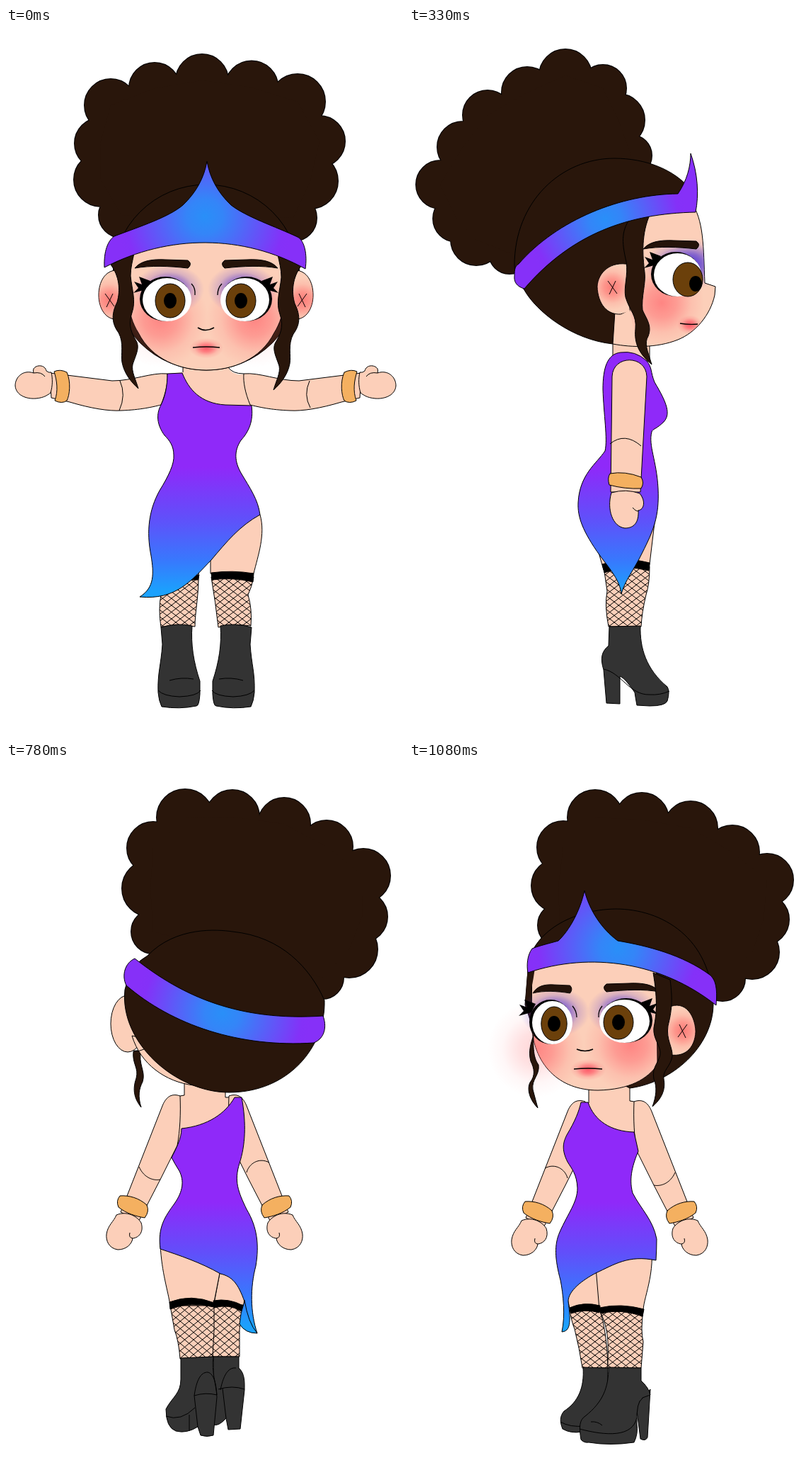
An HTML page with a canvas that plays this animation: 561 px wide and 998 px high, repeating every 1230 ms.

```html
<!DOCTYPE html>
<html lang="en">
<head>
<meta charset="utf-8">
<title>Turnaround</title>
<style>
html, body { margin: 0; width: 100%; height: 100%; overflow: hidden; background: #fff; }
canvas { display: block; width: 561px; height: 998px; }
</style>
</head>
<body>
<canvas id="stage" width="561" height="998"></canvas>
<script>
const ctx = document.getElementById('stage').getContext('2d');
const SKIN = '#fccfb9', HAIR = '#29160b', BOOT = '#333', GOLD = '#f4b060';

function shape(d, fill, line = '#000', width = 1) {
  const p = new Path2D(d);
  if (fill) { ctx.fillStyle = fill; ctx.fill(p); }
  if (line) { ctx.strokeStyle = line; ctx.lineWidth = width; ctx.stroke(p); }
}
const line = (d, width = 1) => shape(d, null, '#000', width);

function oval(x, y, rx, ry, fill, stroke) {
  ctx.beginPath();
  ctx.ellipse(x, y, rx, ry, 0, 0, 7);
  ctx.fillStyle = fill;
  ctx.fill();
  if (stroke) { ctx.strokeStyle = '#000'; ctx.lineWidth = 1; ctx.stroke(); }
}

// Draws with a shift and a horizontal scale; -1 mirrors.
function at(x, y, sx, draw) {
  ctx.save();
  ctx.translate(x, y);
  ctx.scale(sx, 1);
  draw();
  ctx.restore();
}

function within(d, draw) {
  ctx.save();
  ctx.clip(new Path2D(d));
  draw();
  ctx.restore();
}

function glow(x, y, r, rgb, alpha, squash = 1) {
  ctx.save();
  ctx.translate(x, y);
  ctx.scale(1, squash);
  const g = ctx.createRadialGradient(0, 0, 0, 0, 0, r);
  g.addColorStop(0, `rgba(${rgb},${alpha})`);
  g.addColorStop(.35, `rgba(${rgb},${alpha * .7})`);
  g.addColorStop(.7, `rgba(${rgb},${alpha * .2})`);
  g.addColorStop(1, `rgba(${rgb},0)`);
  ctx.fillStyle = g;
  ctx.fillRect(-r, -r, 2 * r, 2 * r);
  ctx.restore();
}

// Skin with rosy cheeks that spill faintly past its edge.
function face(d, ...cheeks) {
  const blush = alpha => cheeks.forEach(([x, y, r]) => glow(x, y, r, '255,105,110', alpha));
  blush(.28);
  shape(d, SKIN);
  within(d, () => blush(.72));
}

function bun(lobes) {
  ctx.beginPath();
  for (const [x, y, r] of lobes) { ctx.moveTo(x + r, y); ctx.arc(x, y, r, 0, 7); }
  ctx.strokeStyle = '#000';
  ctx.lineWidth = 2;
  ctx.stroke();
  ctx.fillStyle = HAIR;
  ctx.fill();
  ctx.beginPath();
  for (const [x, y] of lobes) ctx.lineTo(x, y);
  ctx.fill();
}

function headband(d, x, y, r = 125) {
  const g = ctx.createRadialGradient(x, y, 0, x, y, r);
  g.addColorStop(0, '#298ff8');
  g.addColorStop(.2, '#3485f8');
  g.addColorStop(.9, '#8431f8');
  g.addColorStop(1, '#8630f8');
  shape(d, g);
}

function dress(d) {
  const g = ctx.createLinearGradient(0, 620, 0, 795);
  g.addColorStop(0, '#8f29f9');
  g.addColorStop(.4, '#624efa');
  g.addColorStop(.75, '#3878fd');
  g.addColorStop(1, '#1ba1fd');
  shape(d, g);
}

function stocking(d, slope = 1.3) {
  shape(d, SKIN);
  within(d, () => {
    ctx.beginPath();
    for (let x = 40; x < 540; x += 12.5) {
      for (const s of [-1, 1]) {
        ctx.moveTo(x, 762);
        ctx.lineTo(x + s * slope * 100, 862);
      }
    }
    ctx.strokeStyle = '#000';
    ctx.lineWidth = 1;
    ctx.stroke();
  });
}
const band = d => shape(d, '#000');

function ear(d, x, y) {
  shape(d, SKIN);
  within(d, () => glow(x - 1, y, 32, '255,80,85', .65));
  line(`M${x - 7},${y - 9} L${x + 6},${y + 9} M${x + 4},${y - 9} L${x - 5},${y + 10}`);
}

// The outer corner is on the left.
function eye(x, y, rx, ix, side = 1, iy = 2, px = ix, py = iy) {
  at(x, y, side, () => {
    glow(5, -14, 49, '74,48,215', .95, .72);
    oval(-1, -.5, rx + 2, 31.5, '#000');
    shape('M-28,-14 L-46,-9 L-39,-16 L-45,-25 L-34,-21 L-38,-32 L-22,-26Z', '#000', null);
    oval(1.5, .5, rx + .5, 30.5, '#fff');
    oval(ix, iy, Math.min(21, rx * .65), 24, '#6b400b', true);
    oval(px, py, 9, 11, '#000');
  });
}
const brow = (x, y, sx) => at(x, y, sx, () =>
  shape('M-80,6 C-72,-4 -57,-7 -37,-6 L-5,-5 Q2,0 -5,6 C-32,3 -57,2 -80,6Z', '#24130a'));

function lips(x, y, w = 19) {
  glow(x, y + 1, w + 5, '255,85,100', .95, .6);
  line(`M${x - w},${y} Q${x},${y - 2} ${x + w},${y}`, 1.4);
}

// ---- arms ----
function wideArm(elbow) {
  shape('M228,488 C205,486 180,498 150,498 L62,487 L64,522 L90,528 C120,537 145,541 163,540 C190,539 207,535 219,532 C226,515 229,500 228,488Z', SKIN);
  line(`M${elbow},498 Q${elbow + 9},518 ${elbow - 1},${elbow > 150 ? 540 : 536}`);
  shape('M64,486 Q60,487 57,484 C55,475 43,475 39,481 Q38,484 39,487 C25,482 13,492 13,505 C14,518 28,524 42,523 C55,522 60,517 63,515 C66,505 66,495 64,486Z', SKIN);
  line('M39,487 Q50,485 55,492');
  shape('M68,485 Q76,481 86,486 C92,500 90,518 86,526 Q79,531 69,526 C74,512 72,498 68,485Z', GOLD);
}
function wideArms(leftElbow) {
  wideArm(leftElbow);
  at(564, 0, -1, () => wideArm(135));
}

function lowArm(elbow) {
  shape('M266,476 C252,471 245,480 241,490 L182,640 L208,652 L238,594 L262,546 C266,525 267,500 266,476Z', SKIN);
  line(elbow);
  shape('M176,644 C190,638 205,645 211,655 C215,668 208,676 199,677 C198,685 190,693 178,693 C165,691 161,680 162,671 C164,658 172,654 176,644Z', SKIN);
  line('M199,677 Q193,676 195,669');
  shape('M181,617 C194,616 208,620 219,630 Q223,639 216,648 C204,646 190,642 179,633 Q175,624 181,617Z', GOLD);
}
function lowArms() {
  shape('M272,455 V474 L266,476 L262,548 L300,590 L354,570 L360,520 L341,478 L330,478 V455', SKIN, null);
  line('M272,455 V475 L266,476 M330,455 V478 H341');
  lowArm('M208,576 C215,592 229,596 238,594');
  at(601, 0, -1, () => lowArm('M209,570 C224,562 238,572 241,584'));
}

// ---- heads ----
function frontLock() {
  shape('M148,334 C160,350 162,370 157,387 C148,405 150,418 159,430 C167,445 162,460 164,472 C167,488 177,500 187,509 C183,495 177,485 179,475 C184,460 190,450 183,440 C174,425 174,415 178,402 C184,385 178,370 176,350 C176,338 179,328 181,318Z', HAIR);
}
const frontEar = () =>
  ear('M155,342 C140,343 131,358 131,377 C131,396 141,411 155,411 L176,405 L176,350Z', 147, 384);

function frontHead() {
  oval(283, 352, 132, 131, HAIR, true);
  frontEar();
  at(565, 0, -1, frontEar);
  face('M171,296 H395 C398,370 395,405 379,430 C360,468 320,483 283,483 C246,483 206,468 187,430 C171,405 168,370 171,296Z',
    [218, 411, 68], [351, 411, 68]);
  eye(226, 383, 34, 6);
  eye(339, 383, 34, 7, -1);
  brow(262, 333, 1);
  brow(304, 333, -1);
  line('M262,361 Q268,367 267,377 M305,361 Q299,367 299,377', 1.3);
  line('M271,423 Q282,430 294,423', 1.5);
  lips(283, 451);
  frontLock();
  at(565, 2, -1, frontLock);
  headband('M139,338 C138,315 144,300 153,294 C190,280 230,267 250,250 C268,233 280,212 284,188 C288,212 300,233 318,250 C340,267 380,280 412,295 C422,300 426,320 423,340 C335,291 230,291 139,338Z', 281, 266);
}

function turnedHead() {
  shape('M157,345 C160,250 230,210 295,210 C360,211 410,245 418,285 L423,345 L405,400 L320,440 L275,463 C215,455 158,405 157,345Z', HAIR);
  face('M238,275 L413,270 L414,370 C412,430 375,466 320,466 C275,465 250,450 236,430Z',
    [274, 402, 66], [408, 408, 68]);
  shape('M408,285 L419,290 L423,345 Q414,335 408,285Z', HAIR, null);
  ear('M226,352 C200,335 183,357 182,383 C183,407 198,421 222,415Z', 201, 382);
  eye(281, 368, 35, 10);
  eye(386, 370, 28, 4, -1);
  brow(313, 321, 1);
  brow(356, 323, -.7);
  line('M314,347 Q320,354 319,363 M356,347 Q350,354 350,363', 1.3);
  line('M327,408 Q338,413 350,408', 1.5);
  lips(334, 436, 20);
  shape('M242,300 C236,335 237,355 240,372 C245,390 233,400 232,412 C231,425 245,432 241,450 C236,462 238,475 243,489 C230,478 224,465 227,450 C229,438 217,432 215,418 C214,405 224,395 221,375 C216,355 214,340 218,310Z', HAIR);
  shape('M411,388 C412,410 410,422 404,430 C402,445 414,450 412,465 Q408,480 405,491 C416,480 421,465 416,455 C408,445 410,435 415,425 C419,410 414,398 411,388Z', HAIR);
  headband('M153,346 C151,320 154,310 162,303 C200,275 250,262 292,255 C315,238 332,212 339,184 C345,212 360,240 376,255 C390,259 403,262 413,266 C420,275 421,290 419,300 C330,270 230,285 153,346Z', 292, 266);
}

function sideHead() {
  const profile = 'M318,255 L398,245 C417,270 416,310 418,360 L433,365 L432,377 C426,405 405,430 380,440 C350,452 315,451 288,446 L291,400 L318,340Z';
  shape('M149,335 C149,245 215,184 290,184 C335,184 375,200 398,228 L380,300 L335,400 L288,446 C230,440 180,400 163,370 Q148,350 149,335Z', HAIR);
  face(profile, [357, 388, 60]);
  ear('M312,334 C285,328 267,345 266,365 C267,390 280,405 299,404 L312,400Z', 288, 366);
  shape('M292,405 H299 L312,398 L318,430 H292Z', SKIN, null);
  within(profile, () => {
    glow(405, 333, 36, '74,48,215', .7);
    eye(378, 348, 33, 16, 1, 7, 27, 13);
    glow(397, 419, 18, '255,85,100', .95, .75);
  });
  brow(411, 306, 1);
  line('M383,417 Q395,419 408,418', 1.3);
  shape('M315,265 C300,285 300,300 307,330 C310,350 303,365 306,380 C312,400 322,405 320,425 C318,445 325,460 343,475 C337,455 332,445 338,435 C344,420 335,410 330,398 C328,380 335,360 333,345 C330,320 328,290 341,262Z', HAIR);
  headband('M149,350 C149,340 150,336 155,333 C210,270 300,235 380,234 C393,215 398,195 398,177 C408,205 410,235 405,260 C310,262 230,290 163,368 C152,365 148,358 149,350Z', 277, 270, 115);
}

function backLock() {
  shape('M152,408 C150,425 162,430 164,450 C166,470 168,480 174,493 L179,493 C174,480 182,475 186,460 C184,440 175,425 177,408Z', HAIR);
}

function backHead() {
  for (const x of [153, 413]) oval(x, 374, 21, 38, SKIN, true);
  backLock();
  at(566, 0, -1, backLock);
  oval(284, 345.5, 141, 128, HAIR, true);
  headband('M157,294 C240,332 330,332 410,289 C430,297 428,325 423,334 C340,383 220,383 143,337 C139,320 143,300 157,294Z', 284, 335);
}

function backTurnedHead() {
  oval(172, 368, 24, 40, SKIN, true);
  shape('M180,407 C178,425 188,430 184,445 C178,462 182,475 191,486 C186,470 188,460 193,450 C198,435 186,425 191,405Z', HAIR);
  shape('M178,385 C190,425 225,450 265,455 L250,400Z', SKIN);
  line('M180,406 Q188,408 195,404');
  shape('M200,272 C240,230 300,235 320,238 C390,245 430,290 450,335 C452,400 400,465 315,465 C240,465 160,395 168,320 Q175,285 200,272Z', HAIR);
  headband('M182,276 C250,330 330,365 448,357 C453,370 452,388 435,395 C330,402 235,370 170,314 C163,300 168,282 182,276Z', 306, 353);
}

// ---- bodies ----
function frontBoot() {
  shape('M219,846 Q243,839 263,844 C261,870 265,895 274,922 L274,940 Q273,957 269,957 Q245,962 220,958 Q216,950 215,938 C214,910 219,900 221,870Z', BOOT);
  line('M215,935 Q222,943 245,944 Q270,943 275,935 M231,921 Q248,916 265,919');
}

function frontBody() {
  shape('M250,475 V486 L228,488 V535 H340 L347,533 L336,489 Q318,490 314,478 V470', SKIN, null);
  line('M250,475 V486 M314,475 V479 Q320,488 336,488');
  wideArms(161);
  shape('M230,700 L273,760 L271,790 L219,790Z', SKIN);
  shape('M359,687 C367,715 356,745 350,770 L289,770 V710 L330,670Z', SKIN);
  stocking('M218,775 H272 C272,805 267,825 267,845 Q240,840 219,846 Q215,820 219,800Z');
  stocking('M290,775 H350 Q347,790 342,800 Q348,820 346,844 Q320,840 300,846 Q296,810 290,775Z');
  band('M245,772 H273 L271,779 H240Z');
  band('M290,769 Q320,765 350,770 L349,782 Q320,775 291,779Z');
  frontBoot();
  at(566, 0, -1, frontBoot);
  dress('M228,488 L249,487 C258,510 275,530 310,532 L347,533 C350,555 343,570 332,582 C322,597 323,612 332,628 C345,650 356,665 359,687 C330,703 312,725 290,751 C262,780 240,808 189,803 C210,790 209,770 205,745 C198,710 202,680 217,653 C230,632 238,615 237,603 C237,590 231,582 224,575 C213,560 212,545 219,532 C225,520 228,505 228,488Z');
}

function turnedLegs() {
  shape('M374,683 C375,715 362,740 357,768 L314,772 L320,660 L350,660Z', SKIN);
  shape('M245,660 C232,710 252,750 253,770 L315,770 L320,710 V660Z', SKIN);
  stocking('M315,768 H357 Q355,785 350,797 Q343,825 339,852 H303 Q304,800 315,768Z');
  stocking('M253,770 H315 C300,800 303,820 303,852 H256 L253,815 Q257,800 253,770Z');
  band('M314,764 Q337,758 357,767 L355,775 Q335,768 315,774Z');
  band('M252,769 Q285,760 315,767 L313,775 Q285,768 254,779Z');
  shape('M303,852 L338,851 C336,880 345,900 365,913 C371,920 371,928 367,938 Q355,945 340,942 L303,910Z', BOOT);
  line('M335,934 Q357,936 370,928');
  shape('M243,882 L263,905 L257,952 Q250,956 247,950Z', BOOT);
  shape('M256,852 L302,851 C302,880 310,900 335,920 C343,925 344,935 341,953 Q337,958 330,957 Q300,962 266,957 Q260,945 262,930 Q263,900 254,894 L243,890 Q245,880 256,870Z', BOOT);
  line('M262,922 C268,950 305,948 343,938 M311,933 Q318,927 327,928');
}

function turnedBody() {
  lowArms();
  turnedLegs();
  dress('M265,475 L274,474 C285,500 310,515 358,517 C368,535 368,550 360,560 C352,572 345,583 346,597 C347,620 372,640 374,683 C345,690 330,710 318,727 C300,755 285,790 243,799 C247,780 243,750 236,728 C228,695 229,670 245,648 C260,630 270,612 270,592 C269,575 262,560 261,545 C266,520 267,500 265,475Z');
}

function turnedLeftBody() {
  at(584, 2, -1, () => { lowArms(); turnedLegs(); });
  dress('M243,479 L253,479 C262,505 285,520 318,521 L324,548 C317,565 310,585 316,607 C328,630 345,645 350,672 Q350,685 349,702 C310,694 290,708 264,720 C245,730 225,745 225,760 C229,790 228,802 216,803 C221,780 218,750 214,730 C206,700 205,680 213,662 C225,635 238,620 238,600 C237,580 230,573 224,563 C215,545 218,535 223,525 C235,505 240,492 243,479Z');
}

function sideBody() {
  shape('M288,400 V470 H340 V430', SKIN);
  shape('M265,730 L275,765 H339 L348,690Z', SKIN);
  stocking('M275,760 H340 Q340,785 335,800 Q329,825 328,845 H282 Q276,815 280,795Z');
  band('M273,757 Q305,745 340,755 L339,766 Q305,757 276,769Z');
  shape('M283,845 L327,844 C326,875 335,905 365,930 Q369,936 365,950 Q362,957 340,957 L322,956 Q320,945 319,938 C312,928 305,918 298,915 L298,954 L279,953 L275,906 C270,890 272,880 282,872Z', BOOT);
  line('M275,905 C300,910 312,942 340,941 Q355,942 368,936');
  dress('M299,458 Q320,455 336,470 C344,480 341,485 347,500 C365,530 370,545 360,556 C350,566 344,566 343,570 C338,590 350,610 352,650 C354,690 345,710 330,740 C318,765 305,780 300,799 C298,780 285,765 270,745 C245,710 238,690 239,670 C241,630 265,615 277,597 C281,580 275,545 274,510 C274,480 280,460 299,458Z');
  shape('M287,492 C288,461 335,461 336,492 L327,655 L285,655Z', SKIN);
  line('M284,587 Q305,570 328,590');
  shape('M286,656 Q307,650 326,657 C335,668 332,680 324,681 C325,698 318,706 305,706 C288,704 279,680 286,656Z', SKIN);
  line('M316,677 Q322,684 325,681');
  shape('M284,629 Q305,625 328,634 Q333,642 328,650 Q305,651 283,645 Q280,635 284,629Z', GOLD);
}

function backBoot() {
  shape('M219,823 L267,828 C264,850 270,880 271,905 L272,935 L268,943 L215,944 C209,935 210,920 210,905 C210,880 219,860 219,823Z', BOOT);
  line('M216,891 C223,850 233,847 242,848 C255,850 260,870 267,892 M211,905 Q218,912 220,918 M210,922 L221,928 M257,912 L272,905 M255,930 L272,922');
  shape('M219,895 Q238,889 258,894 L250,954 Q238,958 225,955Z', BOOT);
}

function backBody() {
  shape('M251,465 V483 L228,485 L219,530 L240,560 L345,530 L336,485 H316 V465', SKIN, null);
  line('M251,465 V482 L232,485 M315,465 V485');
  at(0, -4, 1, () => wideArms(135));
  shape('M206,680 C199,705 208,735 216,770 L275,768 V690Z', SKIN);
  stocking('M217,770 H275 Q271,800 267,828 L219,824 L222,798Z');
  stocking('M293,766 L348,780 L345,826 L302,825 Q298,795 293,766Z');
  band('M216,768 Q245,761 275,765 L274,773 Q245,769 218,779Z');
  band('M292,766 H315 L312,775 H294Z');
  backBoot();
  at(569, 0, -1, backBoot);
  dress('M219,530 C265,530 300,520 315,485 L334,485 L341,527 L349,531 C352,550 345,565 335,578 C326,595 326,605 333,618 C348,645 362,670 364,700 C364,730 350,765 360,785 Q365,796 376,799 C345,804 320,795 300,775 C270,745 255,705 205,684 C212,660 235,635 240,610 C241,590 219,575 218,545Z');
}

function backTurnedBody() {
  at(-20, -6, 1, lowArms);
  shape('M303,690 H340 L336,768 H293 L303,715Z', SKIN);
  shape('M218,680 C220,720 229,745 232,766 L293,766 L303,715 V680Z', SKIN);
  stocking('M293,765 H335 L330,800 V838 H292Z', 1.2);
  stocking('M232,766 H294 Q295,800 292,838 L246,841 Q244,815 238,800Z', 1.2);
  band('M293,759 Q315,755 335,766 L333,774 Q315,763 294,769Z');
  band('M231,761 Q262,749 294,762 L293,768 Q262,759 232,771Z');
  shape('M293,838 H329 V854 C338,862 337,875 337,885 L331,940 L314,941 L311,925 Q300,937 293,934Z', BOOT);
  line('M303,885 C308,860 316,853 325,854 M300,884 Q320,878 337,884 M311,925 L306,883');
  shape('M247,840 L293,838 C290,860 297,875 298,895 L293,949 Q284,952 275,949 L271,937 Q255,947 240,943 Q226,938 226,912 C235,895 247,890 247,870Z', BOOT);
  line('M266,893 C270,865 278,860 285,860 C295,862 297,880 298,892 Q282,888 266,893 L271,937 M226,922 Q247,930 267,910 M259,920 V943');
  dress('M248,516 C285,512 310,495 323,472 L333,472 C340,510 338,540 330,565 C322,590 328,605 340,630 C355,655 358,680 353,710 C345,740 345,775 355,805 Q338,805 330,792 Q331,777 337,760 C328,735 320,725 303,721 C275,705 245,695 218,686 C214,655 225,640 238,622 C250,605 252,590 245,576 Q238,565 234,557 C240,545 248,530 248,516Z');
  line('M337,758 Q342,790 355,805');
}

const frontBun = [[277, 74, 37], [347, 84, 37.5], [412, 104, 39], [443, 160, 36], [430, 216, 39], [406, 268, 33],
  [163, 264, 32], [134, 214, 38], [133, 163, 36], [148, 109, 37], [210, 85, 36]];
const turnedBun = [[330, 82, 39], [375, 124, 37], [382, 178, 38], [380, 234, 31], [150, 309, 32], [108, 272, 38],
  [92, 226, 36], [87, 170, 37], [136, 131, 38], [195, 97, 38], [264, 85, 38]];
const sideBun = [[221, 67, 37], [274, 85, 33], [296, 130, 37], [314, 180, 29], [142, 318, 29], [95, 299, 36],
  [67, 269, 33], [44, 221, 34], [76, 168, 36], [111, 123, 35], [167, 91, 36]];
const backBun = [[289, 71, 38], [355, 84, 38], [416, 107, 38], [434, 158, 33], [432, 212, 37], [403, 262, 32],
  [158, 264, 32], [134, 212, 38], [122, 155, 36], [153, 102, 39], [218, 81, 37]];
const backTurnedBun = [[253, 77, 40], [320, 76, 38], [393, 86, 37], [453, 118, 37], [505, 159, 38], [503, 217, 36],
  [485, 263, 40], [447, 303, 30], [208, 238, 31], [204, 177, 40], [208, 120, 37]];

function backTurned() {
  backTurnedBody();
  bun(backTurnedBun);
  backTurnedHead();
}

const poses = [
  () => { frontBody(); bun(frontBun); frontHead(); },
  () => { turnedBody(); bun(turnedBun); turnedHead(); },
  () => { sideBody(); bun(sideBun); sideHead(); },
  () => at(581, 12, -1, backTurned),
  () => { backBody(); bun(backBun); backHead(); },
  backTurned,
  () => {
    at(569, 2, -1, sideBody);
    at(563, 9, -1, () => bun(sideBun));
    at(569, 4, -1, sideHead);
  },
  () => {
    turnedLeftBody();
    at(593, -5, -1, () => bun(turnedBun));
    at(587, -4, -1, turnedHead);
  }
];

const LOOP = 1230, FIRST = 180, STEP = 150;
const start = performance.now();
let shown = -1;

function tick() {
  const t = (performance.now() - start) % LOOP;
  const pose = t < FIRST ? 0 : Math.min(7, 1 + Math.floor((t - FIRST) / STEP));
  if (pose !== shown) {
    shown = pose;
    ctx.fillStyle = '#fff';
    ctx.fillRect(0, 0, 561, 998);
    poses[pose]();
  }
  requestAnimationFrame(tick);
}
tick();
</script>
</body>
</html>
```
